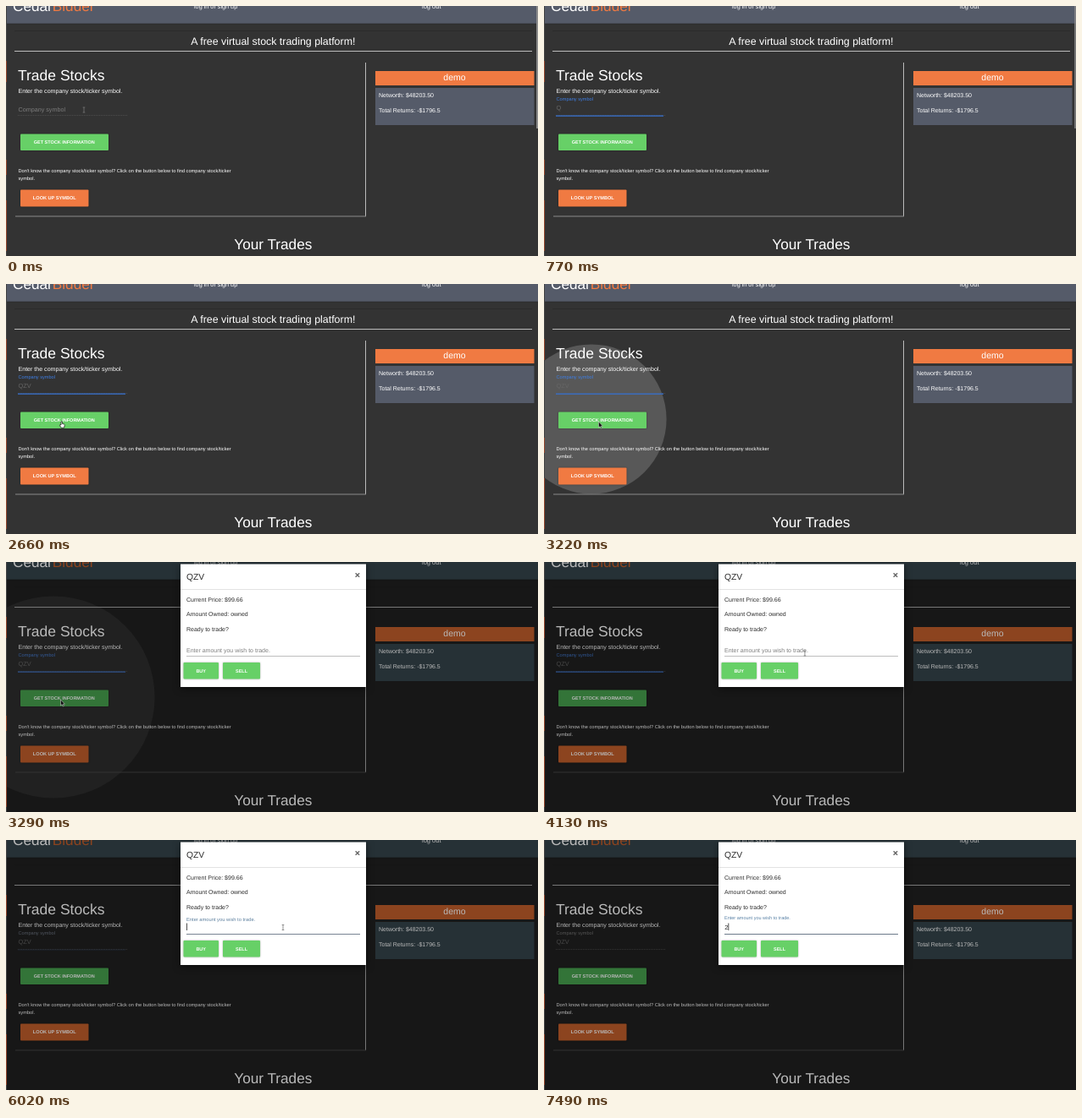
Recreate the animation shown at these times as an HTML page. Size 628 by 296 pixels, loop 7.63 s.

```html
<!DOCTYPE html>
<html lang="en">
<head>
<meta charset="utf-8">
<title>Stock trading page</title>
<style>
html, body { margin: 0; width: 100%; height: 100%; overflow: hidden; background: #333; }
svg {
  --bg: #333; --text: #fff; --line: #bbb; --edge: #8a8a8a; --faint: #2b2b2b;
  --slate: #555b69; --green: #67d067; --orange: #f07a42; --ripple: #fff; --field: 1;
  display: block; width: 628px; height: 296px;
}
svg.dim {
  --bg: #171717; --text: #b9b9b9; --line: #777; --edge: #333; --faint: #151515;
  --slate: #263136; --green: #337438; --orange: #8c441f; --ripple: #666; --field: .6;
}
text { font: 7px "Liberation Sans", Arial, sans-serif; fill: var(--text); text-rendering: geometricPrecision; white-space: pre; }
.btn { font-size: 5.5px; font-weight: bold; text-anchor: middle; }
.mid { text-anchor: middle; }
.raised { filter: drop-shadow(0 .8px 1px rgba(0, 0, 0, .3)); }
.bg { fill: var(--bg); }
.green { fill: var(--green); }
.orange { fill: var(--orange); }
.slate { fill: var(--slate); }
#field { opacity: var(--field); }
#ripple { fill: var(--ripple); }
#modal { --green: #67d067; }
#modal text { fill: #2b2b2b; }
#modal .btn { fill: #fff; }
</style>
</head>
<body>
<svg id="stage" viewBox="0 0 628 296">
  <rect class="bg" width="628" height="296"/>
  <circle id="ripple" cx="56" cy="160"/>
  <rect class="slate raised" width="628" height="20.7"/>
  <text x="8" y="6" style="font-size:17.2px">Cedar<tspan class="orange">Bidder</tspan></text>
  <text x="222" y="3" style="font-size:7.25px">log in or sign up</text>
  <text x="491" y="3" style="font-size:7.5px">log out</text>

  <path d="M10 29.5H621" style="stroke:var(--faint)"/>
  <text class="mid" x="315.3" y="45.5" style="font-size:12.4px">A free virtual stock trading platform!</text>
  <path d="M10 53.5H621M424.5 67V249" style="stroke:var(--line)"/>
  <path d="M11 249H425" style="stroke:var(--edge)"/>

  <text x="14" y="87.5" style="font-size:17.5px">Trade Stocks</text>
  <text x="14.5" y="103.3" style="font-size:7.07px">Enter the company stock/ticker symbol.</text>
  <g id="field">
    <text id="symLabel" x="14.5">Company symbol</text>
    <text id="symbol" x="14.5" y="123.3" style="font-size:7.4px;fill:#666"></text>
    <path d="M14 129.5H144" stroke="#555" stroke-width=".8" stroke-dasharray="1 1"/>
    <path id="symLine" d="M14 130.2H141" stroke="#3672d4" stroke-width="1.3"/>
  </g>

  <rect class="green raised" x="17" y="151.5" width="104" height="19.5" rx="1"/>
  <text class="btn" x="68.7" y="163.2">GET STOCK INFORMATION</text>
  <text x="14.5" y="197.2" style="font-size:5.68px">Don't know the company stock/ticker symbol? Click on the button below to find company stock/ticker</text>
  <text x="14.5" y="205.7" style="font-size:5.68px">symbol.</text>
  <rect class="orange raised" x="17" y="217.5" width="80.5" height="20" rx="1"/>
  <text class="btn" x="57.3" y="229.2" style="font-size:5.6px">LOOK UP SYMBOL</text>

  <rect class="orange" x="436" y="77" width="187.5" height="17"/>
  <text class="mid" x="529.5" y="88.3" style="font-size:10.5px">demo</text>
  <rect class="slate" x="436" y="97" width="187.5" height="44"/>
  <text x="440" y="107.8">Networth: $48203.50</text>
  <text x="440" y="125.8">Total Returns: -$1796.5</text>

  <text class="mid" x="315.3" y="287.8" style="font-size:17.2px">Your Trades</text>
  <rect id="scrollbar" x="626" y="0" width="2" height="145" fill="#8a8a8a"/>

  <g id="modal">
    <rect x="206" y="2.5" width="219" height="145.5" fill="#fff" style="filter:drop-shadow(0 2px 4px rgba(0,0,0,.5))"/>
    <text x="213" y="20.5" style="font-size:10.3px">QZV</text>
    <path d="M412.6 13.2l4.6 4.6m0-4.6l-4.6 4.6" stroke="#666" stroke-width="1.3"/>
    <path d="M206 32.5H425" stroke="#e2e2e2"/>
    <text x="213" y="47">Current Price: $99.66</text>
    <text x="213" y="64.3">Amount Owned: owned</text>
    <text x="213" y="82">Ready to trade?</text>
    <text id="amtLabel" x="213">Enter amount you wish to trade.</text>
    <text id="amount" x="213.3" y="105.5" style="font-size:7.4px">2</text>
    <path id="caret" d="M0 98.5V107" stroke="#222" stroke-width=".8"/>
    <path id="amtLine" d="M213 111.5H418"/>
    <rect class="green raised" x="209.5" y="119" width="41.5" height="19.5" rx="1"/>
    <text class="btn" x="230.2" y="130.7">BUY</text>
    <rect class="green raised" x="256" y="119" width="44" height="19.5" rx="1"/>
    <text class="btn" x="278" y="130.7">SELL</text>
  </g>

  <path d="M.5 0V296" stroke="#444"/>
  <path d="M.5 65V90M.5 182V200M.5 230V290" stroke="#96492f"/>

  <g id="pointer">
    <path id="beam" d="M-1.3-3H1.3M0-3V3M-1.3 3H1.3" fill="none" stroke="#777" stroke-width=".8"/>
    <path id="hand" d="M-1-3q.8-.9 1.4 0V-.6l2.3.6q.7.3.5 1.3L2.6 4.2H-.8L-2.8 1.2q.3-1 1.8-.2Z" fill="#fff" stroke="#111" stroke-width=".7"/>
    <path id="arrow" d="M-1.5-3V4L.1 2.6 1.2 5 2.3 4.5 1.3 2.2H3.4Z" fill="#111" stroke="#ddd" stroke-width=".5"/>
  </g>
</svg>
<script>
const LOOP = 7630;
const $ = id => document.getElementById(id);
const lerp = (a, b, k) => a + (b - a) * k;
const ramp = (t, from, to) => Math.min(1, Math.max(0, (t - from) / (to - from)));
const ease = (t, from, to) => { const k = ramp(t, from, to); return k * k * (3 - 2 * k); };
const show = (id, on) => $(id).style.display = on ? '' : 'none';
const mix = (a, b, k) => `rgb(${a.map((v, i) => Math.round(lerp(v, b[i], k)))})`;

function floatLabel(id, k, y, size, fill) {
  const el = $(id);
  el.setAttribute('y', lerp(y[0], y[1], k));
  el.style.fontSize = lerp(size[0], size[1], k) + 'px';
  el.style.fill = fill;
}

function drawPointer(t) {
  const down = ease(t, 1650, 2310), across = ease(t, 3430, 4270);
  const x = lerp(lerp(92, 66, down), 327, across);
  const y = lerp(lerp(123, 166, down), 103.5, across);
  const kind = t < 3150 ? (y < 150 ? 'beam' : 'hand') : (x < 290 ? 'arrow' : 'beam');
  for (const id of ['beam', 'hand', 'arrow']) show(id, id === kind);
  show('pointer', t < 700 || (t >= 1680 && t < 7000));
  $('pointer').setAttribute('transform', `translate(${x} ${y})`);
}

function draw(t) {
  const focus = ease(t, 70, 350), leave = ease(t, 5810, 6090);

  // Symbol field
  const blue = mix([125, 125, 125], [62, 126, 228], focus * (1 - leave));
  floatLabel('symLabel', focus, [125.2, 111.8], [7.2, 5.63], blue);
  $('symLine').style.opacity = focus * (1 - leave);
  $('symbol').textContent = 'QZV'.slice(0, (t >= 770) + (t >= 1120) + (t >= 1470));
  $('scrollbar').style.opacity = 1 - ramp(t, 700, 980);

  // Button ripple
  $('ripple').setAttribute('r', Math.max(0, (t - 3021) * .443));
  $('ripple').style.opacity = .18 * (1 - ramp(t, 3220, 3500));
  show('ripple', t > 3021 && t < 3500);

  // Dialog and amount field
  const open = t >= 3290;
  $('stage').classList.toggle('dim', open);
  show('modal', open);
  floatLabel('amtLabel', leave, [107, 94], [7, 5.53], mix([125, 125, 125], [88, 128, 165], leave));
  $('amtLine').style.stroke = mix([190, 190, 190], [108, 122, 138], leave);
  const typed = t >= 7000;
  show('amount', typed);
  show('caret', typed || (t >= 5810 && t < 6230));
  $('caret').setAttribute('transform', `translate(${typed ? 217.8 : 213.5} 0)`);

  drawPointer(t);
}

const start = performance.now();
function tick() {
  draw((performance.now() - start) % LOOP);
  requestAnimationFrame(tick);
}
tick();
</script>
</body>
</html>
```
